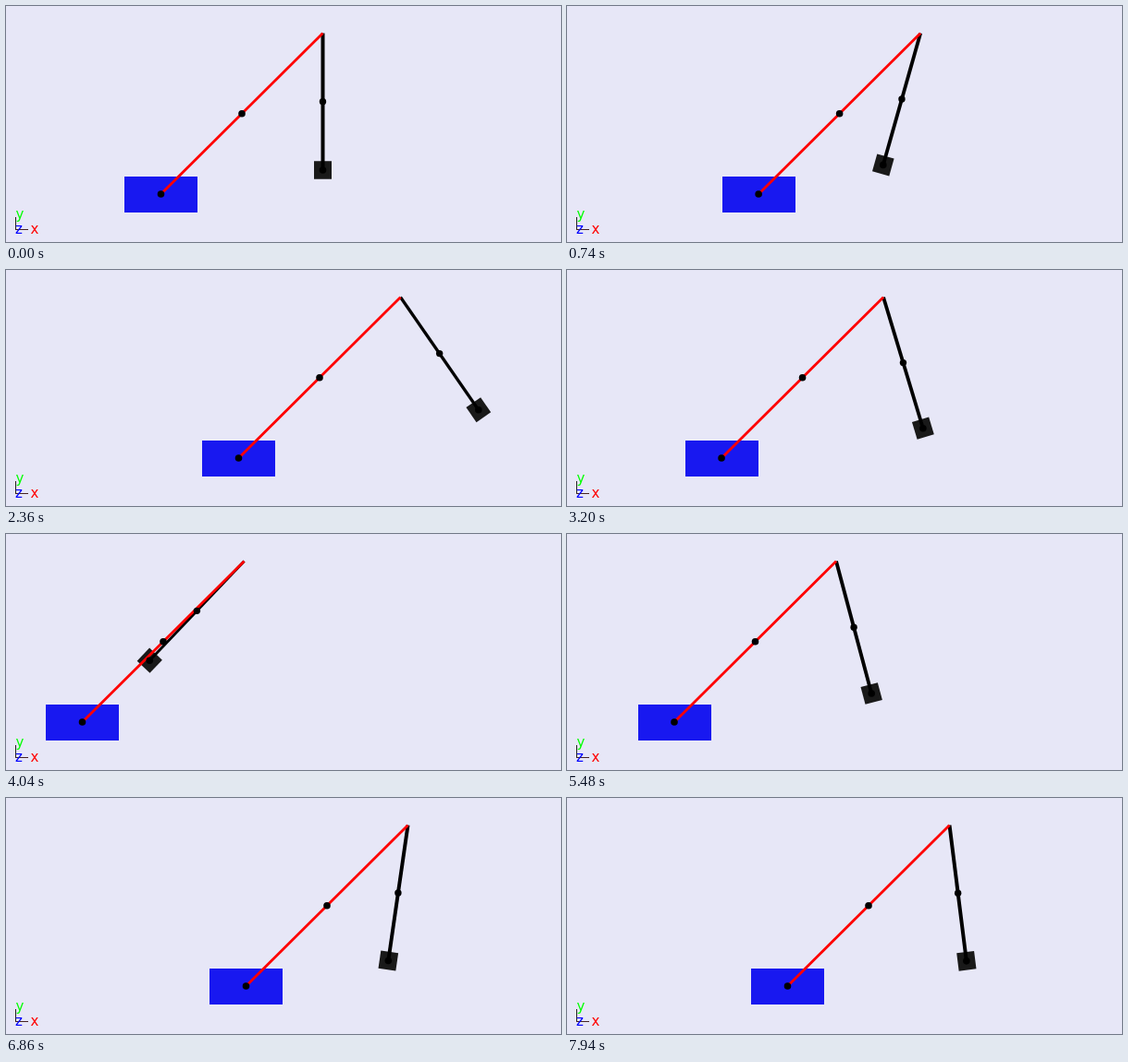
Recreate the animation shown at these times as an HTML page with a canvas. Size 600 by 256 pixels, loop 8 s.

```html
<!DOCTYPE html>
<html lang="en">
<head>
<meta charset="utf-8">
<title>Cart with hanging pendulum</title>
<style>
  html, body { margin: 0; overflow: hidden; }
  canvas { display: block; }
</style>
</head>
<body>
<canvas id="stage" width="600" height="256"></canvas>
<script>
const ctx = document.getElementById('stage').getContext('2d');
const LOOP = 8000, FIRST = 200, STEP = 60;
const REST = { x: 167.5, y: 204 }, REACH = 175, ROD = 148.5;

// [time in ms, cart displacement in px, pendulum angle in degrees]
const KEYS = [
  [140, 0, 0], [410, 10, -5], [680, 34, -14], [980, 62, -21],
  [1460, 91, -11.5], [1880, 99, 10.8], [2360, 84, 34.6], [2660, 63, 39.7],
  [3080, 15, 25], [3500, -39, -8], [4040, -85, -43.5], [4340, -96, -47],
  [4700, -96, -34], [5180, -76, -5.5], [5480, -51.5, 14.9], [5840, -5, 28.8],
  [6020, 22, 27.2], [6200, 43, 20], [6500, 70.5, 4.5], [6860, 92, -8.2],
  [7220, 98.7, -12], [7700, 87, -2], [7940, 71, 7.1]
];

const slope = (a, b, c) => (KEYS[b][c] - KEYS[a][c]) / (KEYS[b][0] - KEYS[a][0]);

function tangent(i, c) {
  const last = KEYS.length - 1;
  if (i === 0) return 0;
  if (i === last) return slope(i - 1, i, c);
  const before = KEYS[i][0] - KEYS[i - 1][0], after = KEYS[i + 1][0] - KEYS[i][0];
  return (slope(i - 1, i, c) * after + slope(i, i + 1, c) * before) / (before + after);
}

// Cubic Hermite curve through column c of KEYS
function sample(t, c) {
  if (t <= KEYS[0][0]) return KEYS[0][c];
  let i = 0;
  while (i < KEYS.length - 2 && t > KEYS[i + 1][0]) i++;
  const span = KEYS[i + 1][0] - KEYS[i][0];
  const u = Math.min(1, (t - KEYS[i][0]) / span), v = 1 - u;
  return KEYS[i][c] * v * v * (1 + 2 * u) + KEYS[i + 1][c] * u * u * (3 - 2 * u)
    + span * u * v * (v * tangent(i, c) - u * tangent(i + 1, c));
}

function line(x1, y1, x2, y2, width, color) {
  ctx.lineWidth = width;
  ctx.strokeStyle = color;
  ctx.beginPath();
  ctx.moveTo(x1, y1);
  ctx.lineTo(x2, y2);
  ctx.stroke();
}

function dot(x, y, r) {
  ctx.fillStyle = '#000';
  ctx.beginPath();
  ctx.arc(x, y, r, 0, 2 * Math.PI);
  ctx.fill();
}

function label(text, x, y, color) {
  ctx.fillStyle = color;
  ctx.fillText(text, x, y);
}

function drawAxes() {
  line(10.5, 229, 10.5, 243, 1, '#222');
  line(10, 242.5, 24, 242.5, 1, '#422');
  ctx.font = '15px "DejaVu Sans", sans-serif';
  label('y', 10.5, 231, '#0f0');
  label('z', 10, 247, '#00f');
  label('x', 26.5, 247, '#f00');
}

function draw(t) {
  const cartX = REST.x + sample(t, 1), angle = sample(t, 2) * Math.PI / 180;
  const tipX = cartX + REACH, tipY = REST.y - REACH + 0.5;
  const bobX = tipX + ROD * Math.sin(angle), bobY = tipY + ROD * Math.cos(angle);

  ctx.fillStyle = '#e7e7f7';
  ctx.fillRect(0, 0, 600, 256);
  ctx.fillStyle = '#1818f0';
  ctx.fillRect(Math.round(cartX - 39.5), 185, 79, 39);

  ctx.save();
  ctx.translate(bobX, bobY);
  ctx.rotate(-angle);
  ctx.fillStyle = '#191919';
  ctx.fillRect(-9.5, -9.75, 19, 19.5);
  ctx.restore();

  line(tipX, tipY, bobX, bobY, 4 * Math.cos(angle), '#000');
  line(cartX, REST.y, tipX, tipY, 2.8, '#f00');
  dot(cartX, REST.y, 3.8);
  dot((cartX + tipX) / 2, (REST.y + tipY) / 2, 3.8);
  dot((tipX + bobX) / 2, (tipY + bobY) / 2, 3.7);
  dot(bobX, bobY, 3.8);
  drawAxes();
}

function tick(now) {
  const t = now % LOOP;
  draw(t < FIRST ? 0 : FIRST + STEP * Math.floor((t - FIRST) / STEP));
  requestAnimationFrame(tick);
}
requestAnimationFrame(tick);
</script>
</body>
</html>
```
